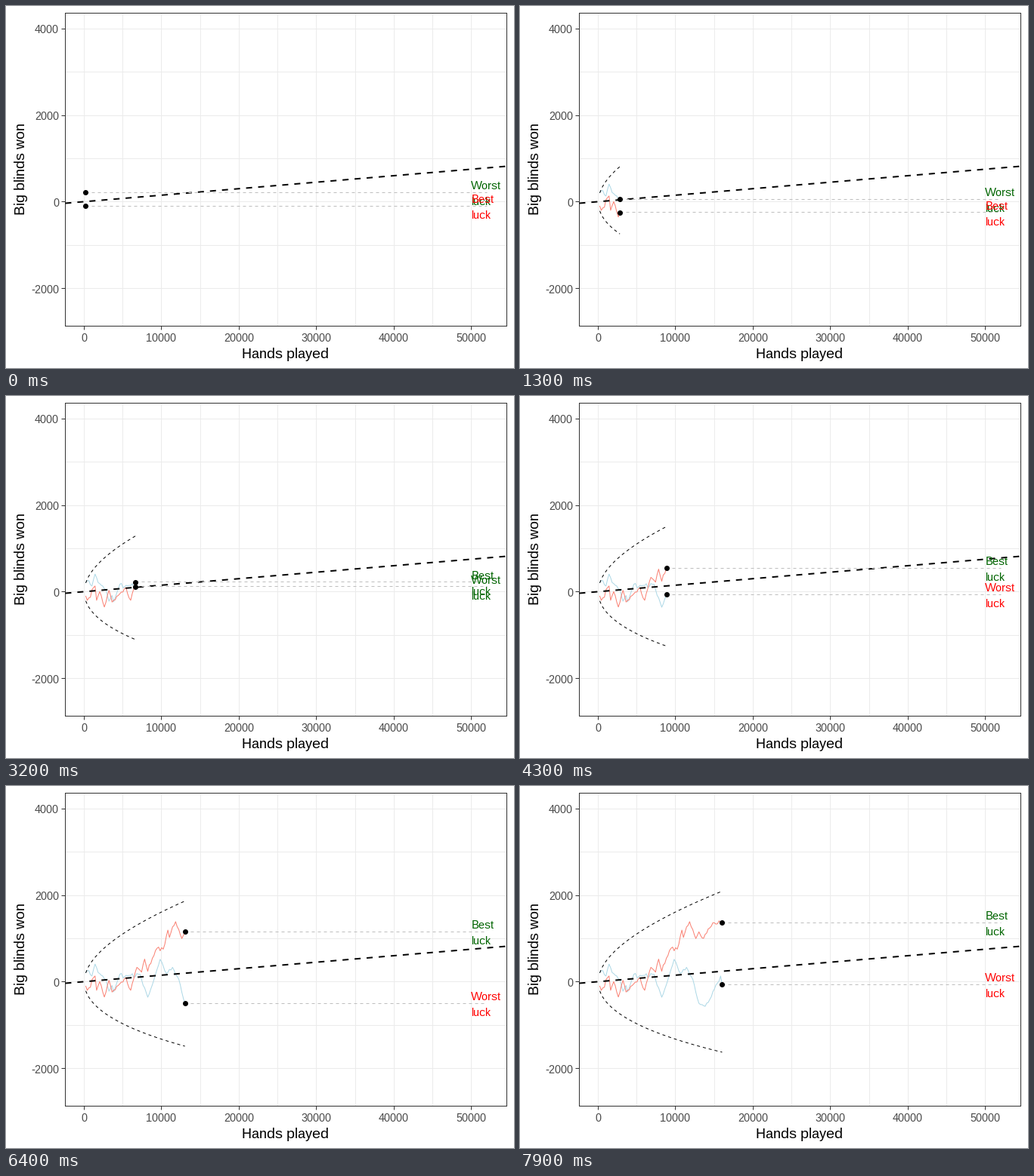
Write a matplotlib script that moves like this. It is 672 px wide and 480 px high and loops after 8 s.

```python
import numpy as np
import matplotlib.pyplot as plt
from matplotlib.animation import FuncAnimation
from matplotlib.transforms import offset_copy

plt.rcParams.update({
    "font.family": "Liberation Sans",
    "text.hinting": "native",
    "text.hinting_factor": 1,
    "text.kerning_factor": 6,
})

W, H, DPI = 672, 480, 96
PX = 72 / DPI                      # one pixel in points
LEFT, RIGHT, TOP, BOTTOM = 78.45, 662.45, 8.83, 424.0

STEPS, STEP_HANDS = 80, 200
WIN_RATE, SPREAD = 0.015, 1.96 * 7.5
LAST_HAND, SEG_END = 50000, 52000

hands = STEP_HANDS * np.arange(1, STEPS + 1)
mean = WIN_RATE * hands
band = SPREAD * np.sqrt(hands)

# Main swings of each run: (step, big blinds won)
BEST = [(0, -95), (1, -190), (6, 140), (7, -190), (9, 10), (12, -345),
        (15, 40), (17, -230), (26, 100), (29, -190), (33, 340), (36, 230),
        (38, 530), (40, 250), (43, 550), (46, 780), (50, 760), (53, 1200),
        (54, 1030), (58, 1395), (62, 1005), (64, 1160), (67, 1010),
        (73, 1370), (79, 1368)]
WORST = [(0, 220), (2, 265), (4, 140), (6, 415), (8, 220), (13, 62),
         (15, -210), (17, -80), (18, -225), (22, 180), (32, 130), (35, 180),
         (40, -350), (43, -60), (48, 525), (52, 202), (56, 340), (60, 70),
         (64, -490), (67, -545), (70, -470), (78, 140), (79, -60)]


def run_of_luck(swings, seed):
    """Straight moves between the swings, roughened by small seeded noise."""
    steps, values = np.transpose(swings)
    noise = np.random.default_rng(seed).normal(0, 25, STEPS)
    noise[steps] = 0
    return np.interp(np.arange(STEPS), steps, values) + noise


fig = plt.figure(figsize=(W / DPI, H / DPI), dpi=DPI, facecolor="white")
ax = fig.add_axes([LEFT / W, 1 - BOTTOM / H, (RIGHT - LEFT) / W, (BOTTOM - TOP) / H])

pad_x = 0.05 * (SEG_END - STEP_HANDS)
x0, x1 = STEP_HANDS - pad_x, SEG_END + pad_x
peak = 1.1 * SPREAD * np.sqrt(LAST_HAND)
y0, y1 = WIN_RATE * LAST_HAND - peak, WIN_RATE * LAST_HAND + peak
ax.set(xlim=(x0, x1), ylim=(y0, y1))

x_ticks = range(0, 50001, 10000)
y_ticks = range(-2000, 4001, 2000)
ax.set_xticks(x_ticks)
ax.set_yticks(y_ticks)
ax.set_xticks(range(5000, 50000, 10000), minor=True)
ax.set_yticks(range(-1000, 4000, 2000), minor=True)
ax.grid(which="both", color="#EBEBEB", lw=PX)
ax.set_axisbelow(True)
ax.tick_params(length=3.5, width=PX, color="#333333",
               labelbottom=False, labelleft=False)
ax.tick_params(which="minor", length=0)
for spine in ax.spines.values():
    spine.set(color="#333333", linewidth=PX)


def put(x, y, text, px, color="black", ha="center", **kw):
    fig.text(x / W, 1 - y / H, text, fontsize=px * PX, color=color,
             ha=ha, va="baseline", **kw)


for v in x_ticks:
    put(LEFT + (v - x0) / (x1 - x0) * (RIGHT - LEFT), 445, str(v), 15, "#4D4D4D")
for v in y_ticks:
    y = BOTTOM - (v - y0) / (y1 - y0) * (BOTTOM - TOP)
    put(70, y + 6.5, str(v), 15, "#4D4D4D", ha="right")
put((LEFT + RIGHT) / 2 - 0.8, 467, "Hands played", 19)
put(25, (TOP + BOTTOM) / 2, "Big blinds won", 19,
    rotation=90, rotation_mode="anchor")

# Curves run through pixel centres, as the snapped grid lines do
centred = offset_copy(ax.transData, fig, 0.5, -0.5, units="dots")


def line(color, width=1, dashed=False, z=2, transform=centred):
    style = (0, (4, 4)) if dashed else "-"
    return ax.plot([], [], color=color, lw=width * PX, ls=style,
                   zorder=z, transform=transform)[0]


class Player:
    def __init__(self, name, won, color):
        self.won = won
        self.path = line(color)
        self.guide = line("#BEBEBE", dashed=True, z=4, transform=ax.transData)
        self.dot = ax.plot([], [], "o", color="black", ms=7 * PX, mew=0,
                           antialiased=False, zorder=5, transform=centred)[0]
        self.words = [
            ax.text(LAST_HAND, 0, word, fontsize=15 * PX, va="baseline", zorder=6,
                    transform=offset_copy(ax.transData, fig, 0, dy, units="dots"))
            for word, dy in ((name, 3.5), ("luck", -17.5))]

    def show(self, k):
        x, y = hands[k], self.won[k]
        self.path.set_data(hands[:k + 1], self.won[:k + 1])
        self.guide.set_data([x, SEG_END], [y, y])
        self.dot.set_data([x], [y])
        for word in self.words:
            word.set(y=y, color="darkgreen" if y > 0 else "red")


players = [Player("Worst", run_of_luck(WORST, 1), "lightblue"),
           Player("Best", run_of_luck(BEST, 2), "salmon")]
upper, lower = (line("black", dashed=True, z=3) for _ in range(2))
trend = line("black", 2, dashed=True, z=3.5, transform=ax.transData)
trend.set_data([x0, x1], [WIN_RATE * x0, WIN_RATE * x1])


def update(k):
    for player in players:
        player.show(k)
    upper.set_data(hands[:k + 1], (mean + band)[:k + 1])
    lower.set_data(hands[:k + 1], (mean - band)[:k + 1])


anim = FuncAnimation(fig, update, frames=STEPS, interval=1000 // 10,
                     init_func=lambda: update(0), repeat=True, repeat_delay=0)
plt.show()
```
